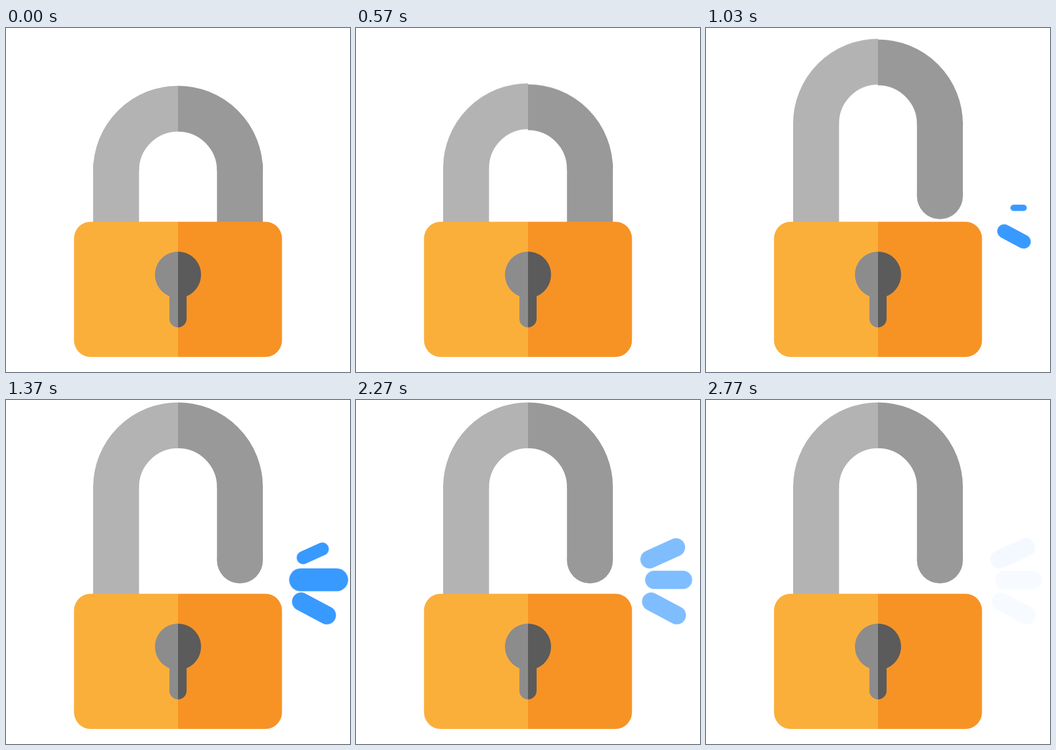
Write an HTML page without scripts that moves like this. It is 640 px wide and 640 px high and loops after 4410 ms.

```html
<!DOCTYPE html>
<html lang="en">
<head>
<meta charset="utf-8">
<title>Padlock opening</title>
<style>
  html, body { margin: 0; width: 100%; height: 100%; overflow: hidden; background: #fff; }
  svg { display: block; width: 100%; height: 100%; }

  .steel { fill: none; stroke-width: 85.4; }
  .light { stroke: #b3b3b3; }
  .dark { stroke: #999; }
  .slide, .late {
    --rest: 103px;
    --dip: 138px;
    animation: slide 4410ms cubic-bezier(.333, 0, .667, 1) infinite;
  }
  .late { animation-name: late; }
  .leg { --rest: 92px; }
  .free { --dip: 128px; }

  /* dip into the body, then spring up */
  @keyframes slide {
    0% { transform: translateY(var(--rest)); }
    4.535% { transform: translateY(var(--dip)); }
    28.345%, 100% { transform: translateY(0); }
  }
  @keyframes late {
    0% { transform: translateY(var(--rest)); }
    4.762% { transform: translateY(var(--dip)); }
    28.571%, 100% { transform: translateY(0); }
  }

  .ray {
    stroke: #3899ff;
    stroke-width: 34;
    stroke-linecap: round;
    animation: var(--pop) 4410ms cubic-bezier(.333, 0, .667, 1) infinite,
               fade 4410ms infinite;
  }
  .top { --pop: pop-top; --end: .06; }
  .mid { --pop: pop-mid; --end: .04; }
  .low { --pop: pop-low; --end: .045; }

  @keyframes pop-low {
    0%, 16.92% { transform: scale(0); }
    28.25% { transform: scale(1.26); }
    31.11%, 100% { transform: scale(1); }
  }
  @keyframes pop-mid {
    0%, 19.46% { transform: scale(0); }
    30.79% { transform: scale(1.26); }
    33.9%, 100% { transform: scale(1); }
  }
  @keyframes pop-top {
    0%, 24.9% { transform: scale(0); }
    36.24% { transform: scale(1.26); }
    39.73%, 100% { transform: scale(1); }
  }
  /* coarse fade, about 83 ms per step */
  @keyframes fade {
    0% { opacity: 1; animation-timing-function: step-end; }
    46.032% { opacity: .91; animation-timing-function: steps(3, end); }
    51.429% { opacity: .65; animation-timing-function: steps(6, end); }
    62.766%, 100% { opacity: var(--end); }
  }
</style>
</head>
<body>
<svg viewBox="0 0 640 640">
  <defs>
    <path id="case" d="M320 360.5H157.5a31 31 0 0 0-31 31V581a31 31 0 0 0 31 31H320z"/>
    <path id="hole" d="M320 416a43 43 0 0 0-16 82.9V541a16 16 0 0 0 16 16z"/>
    <path id="arc" d="M204.8 162.3A115.2 115.2 0 0 1 320 47.1"/>
  </defs>

  <g class="steel light">
    <path class="slide leg" d="M204.8 160V480"/>
    <use class="slide" href="#arc"/>
  </g>
  <g class="steel dark">
    <g class="slide leg free">
      <path d="M435.2 160V299"/>
      <circle cx="435.2" cy="298.5" r="42.7" fill="#999" stroke="none"/>
    </g>
    <g class="late"><use href="#arc" transform="matrix(-1 0 0 1 640 0)"/></g>
  </g>

  <use href="#case" fill="#fbaf3b"/>
  <use href="#hole" fill="#8c8c8c"/>
  <g transform="matrix(-1 0 0 1 640 0)">
    <use href="#case" fill="#f79325"/>
    <use href="#hole" fill="#5b5b5b"/>
  </g>

  <g transform="translate(570.7 285.3) rotate(-24.4)"><path class="ray top" d="M-27.1 0H27.1"/></g>
  <g transform="translate(581.6 334.6)"><path class="ray mid" d="M-26.8 0H26.8"/></g>
  <g transform="translate(573 387.8) rotate(28)"><path class="ray low" d="M-27.1 0H27.1"/></g>
</svg>
</body>
</html>
```
